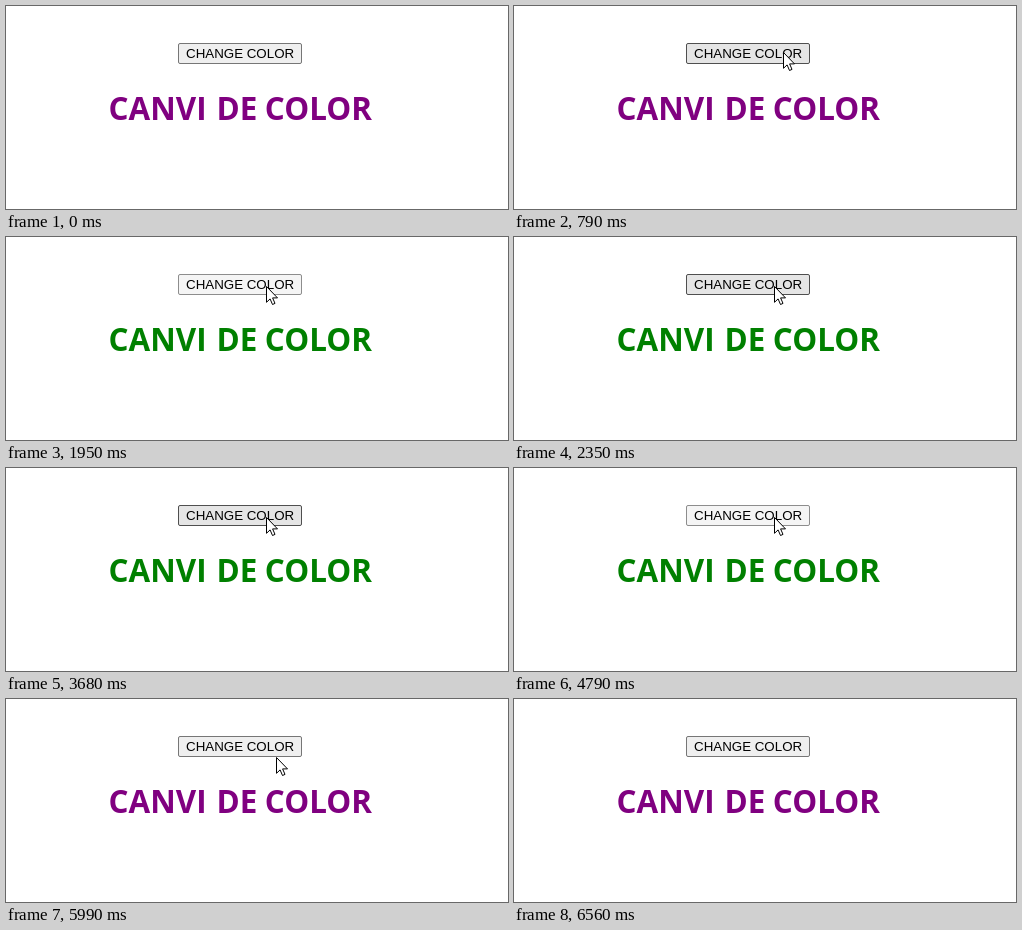
An HTML page for the animation above (7560 ms loop, 502 by 203 pixels).

```html
<!DOCTYPE html>
<html lang="ca">
<head>
<meta charset="utf-8">
<title>Canvi de color</title>
<style>
  html, body { margin: 0; width: 100%; height: 100%; overflow: hidden; background: #fff; }
  svg { display: block; }
  .label { font: 13.333px "Liberation Sans", Arial, sans-serif; }
  .title { font: 700 31.4px "Open Sans", sans-serif; }
</style>
</head>
<body>
<svg width="502" height="203" viewBox="0 0 502 203">
  <rect id="button" x="172.5" y="37.5" width="123" height="20" rx="1.5"/>
  <text class="label" x="180" y="52">CHANGE COLOR</text>
  <text class="title" id="title" y="114"><tspan x="102.6">CANVI</tspan> <tspan x="210.5">DE</tspan> <tspan x="258.8">COLOR</tspan></text>
  <path id="cursor" d="M.5 .5V16.3L4.1 12.9L6.5 18.5L9 17.4L6.6 11.9H11.5Z" fill="#fff" stroke="#000"/>
</svg>
<script>
const LOOP = 7560, ENTER = 140, LEAVE = 6560;
const $ = id => document.getElementById(id);
const button = $("button"), title = $("title"), cursor = $("cursor");

// mouse down and up times in turn; each release swaps the title colour
const presses = [
  1710, 1800, 1950, 2090, 2240, 2350, 3060, 3210, 3500, 3680,
  4070, 4220, 4400, 4530, 4660, 4820, 5130, 5300, 5540, 5710
];

// pointer moves, starting from the stage edge
const edge = { x: 430, y: 198 };
const moves = [
  { from: ENTER, to: 890, x: 262, y: 38 },
  { from: 990, to: 1110, x: 261, y: 33 },
  { from: 1110, to: 1290, x: 261, y: 49 },
  { from: 5890, to: LEAVE, ...edge }
];

const looks = {
  idle: ["#efefef", "#767676"],
  hover: ["#e5e5e5", "#4f4f4f"],
  pressed: ["#f5f5f5", "#8d8d8d"]
};

const clamp = k => Math.min(1, Math.max(0, k));
const ease = k => k * k * (3 - 2 * k);

function pointerAt(t) {
  let { x, y } = edge;
  for (const m of moves) {
    const k = ease(clamp((t - m.from) / (m.to - m.from)));
    x += (m.x - x) * k;
    y += (m.y - y) * k;
  }
  return { x: Math.round(x), y: Math.round(y) };
}

const overButton = ({ x, y }) => x >= 172 && x < 296 && y >= 37 && y < 58;

function draw(t) {
  const tip = pointerAt(t);
  const count = presses.filter(p => p <= t).length;
  const state = count % 2 ? "pressed" : overButton(tip) ? "hover" : "idle";
  const green = Math.floor(count / 2) % 2;

  button.setAttribute("fill", looks[state][0]);
  button.setAttribute("stroke", looks[state][1]);
  title.setAttribute("fill", green ? "#008000" : "#800080");
  cursor.setAttribute("visibility", t >= ENTER && t < LEAVE ? "visible" : "hidden");
  cursor.setAttribute("transform", `translate(${tip.x - 1} ${tip.y})`);
}

const start = performance.now();
function tick() {
  draw((performance.now() - start) % LOOP);
  requestAnimationFrame(tick);
}
tick();
</script>
</body>
</html>
```
